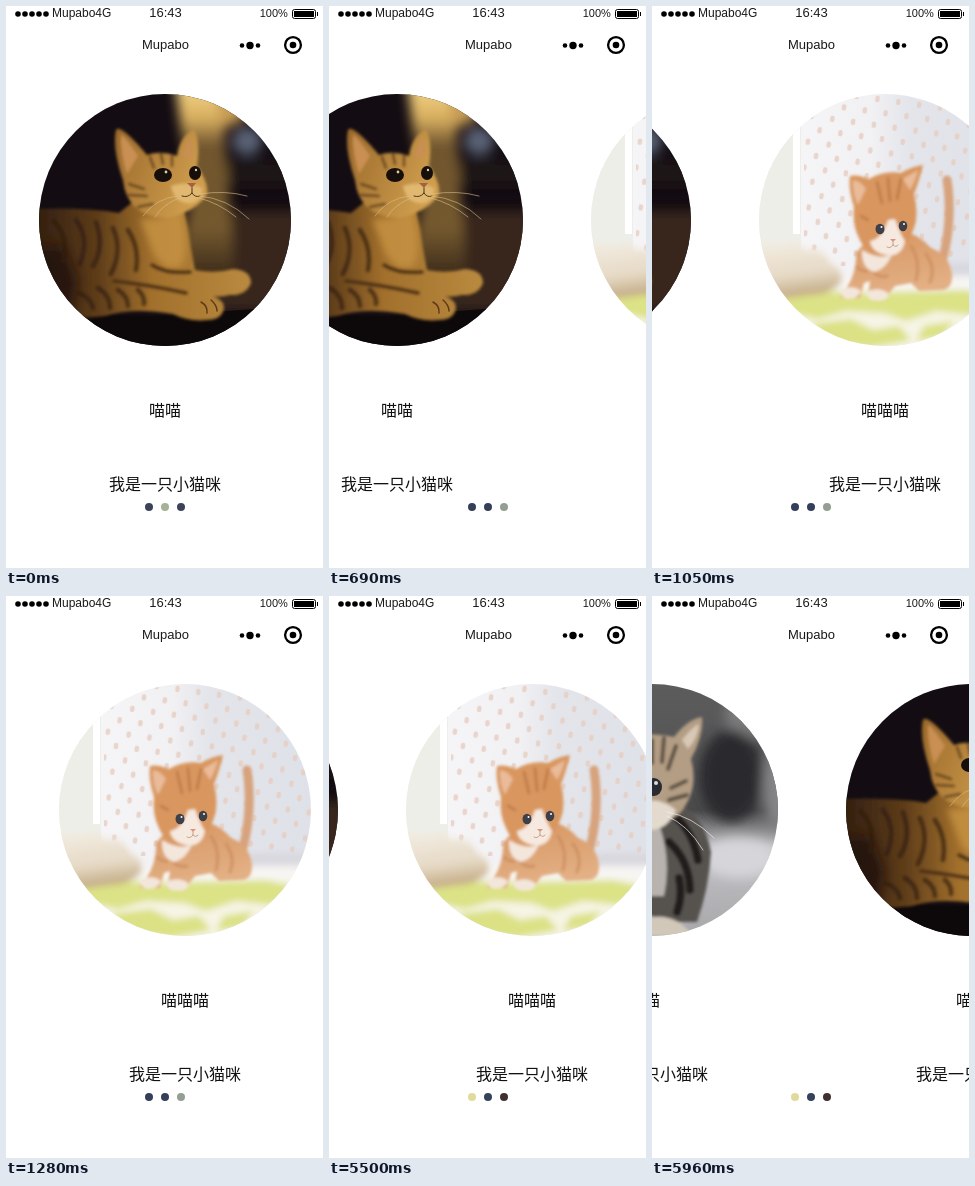
Animation of 317x562 px, one loop 6.01 s. Source, as an HTML page:

```html
<!DOCTYPE html>
<html lang="zh-CN">
<head>
<meta charset="utf-8">
<title>小猫</title>
<style>
  html, body { margin: 0; width: 100%; height: 100%; overflow: hidden; background: #fff; }
  svg { display: block; width: 100vw; height: 100vh; }
  .bar { font-family: "Liberation Sans", Arial, sans-serif; fill: #1a1a1a; }
  .caption { font: 300 16px "Noto Sans CJK SC", "Noto Sans CJK", sans-serif; fill: #111; text-anchor: middle; }
  .line { fill: none; stroke-linecap: round; }
</style>
</head>
<body>
<svg viewBox="0 0 317 562">
  <defs>
    <clipPath id="disc"><circle cx="159" cy="214" r="126"/></clipPath>
    <filter id="soft" x="-30%" y="-30%" width="160%" height="160%"><feGaussianBlur stdDeviation="1.500"/></filter>
    <filter id="hazy" x="-30%" y="-30%" width="160%" height="160%"><feGaussianBlur stdDeviation="3"/></filter>
    <filter id="blur" x="-50%" y="-50%" width="200%" height="200%"><feGaussianBlur stdDeviation="6"/></filter>
    <linearGradient id="lamp" x2="0" y2="1">
      <stop stop-color="#f6d78c"/><stop offset=".17" stop-color="#d9b060"/>
      <stop offset=".3" stop-color="#70552f"/><stop offset=".7" stop-color="#74592f"/>
      <stop offset="1" stop-color="#281912"/>
    </linearGradient>
    <linearGradient id="amber">
      <stop stop-color="#2f1c0f"/><stop offset=".3" stop-color="#5d3c19"/>
      <stop offset=".55" stop-color="#a2702c"/><stop offset="1" stop-color="#b98a3f"/>
    </linearGradient>
    <linearGradient id="face" x2="1" y2=".4">
      <stop stop-color="#9a682a"/><stop offset="1" stop-color="#cf9e4d"/>
    </linearGradient>
    <linearGradient id="ginger" x2=".3" y2="1">
      <stop stop-color="#d6945f"/><stop offset="1" stop-color="#e3b085"/>
    </linearGradient>
    <linearGradient id="wall">
      <stop stop-color="#f8f7f8"/><stop offset=".45" stop-color="#f1f0f3"/>
      <stop offset=".6" stop-color="#e3e5eb"/><stop offset="1" stop-color="#dfe1e8"/>
    </linearGradient>
    <linearGradient id="wool" x2=".2" y2="1">
      <stop stop-color="#f3ede3"/><stop offset=".6" stop-color="#e6dac6"/><stop offset="1" stop-color="#bfa57c"/>
    </linearGradient>
    <linearGradient id="mist" x2="0" y2="1">
      <stop stop-color="#5c5c5d"/><stop offset=".3" stop-color="#555556"/><stop offset=".5" stop-color="#4a4a4b"/>
      <stop offset=".65" stop-color="#c2c2c6"/><stop offset="1" stop-color="#a8a8ab"/>
    </linearGradient>
    <pattern id="spots" width="21" height="26" patternUnits="userSpaceOnUse" patternTransform="rotate(8)">
      <ellipse cx="5" cy="6" rx="2.300" ry="3.200" fill="#e6cdc0"/>
      <ellipse cx="16" cy="19" rx="2.300" ry="3.200" fill="#e6cdc0"/>
    </pattern>
  </defs>

  <g id="track">
    <!-- grey kitten -->
    <g transform="translate(-320)">
      <g clip-path="url(#disc)">
        <path fill="url(#mist)" d="M33 88h252v252H33z"/>
        <g filter="url(#blur)">
          <ellipse cx="258" cy="118" rx="26" ry="24" fill="#7b7b7c"/>
          <ellipse cx="238" cy="180" rx="32" ry="46" fill="#2c2c2d"/>
          <ellipse cx="284" cy="190" rx="14" ry="42" fill="#858587"/>
          <ellipse cx="246" cy="262" rx="38" ry="20" fill="#d6d6da"/>
        </g>
        <g filter="url(#soft)">
          <path fill="#56524f" d="M105 210h85q22 14 28 46-2 36-14 70H105z"/>
          <path fill="#b8b3ae" d="M135 226h30q14 36 6 74h-36z"/>
          <path class="line" stroke="#201f1f" stroke-width="8" d="M182 220q18 16 23 44M176 246q20 18 21 48M186 282q4 18-2 34"/>
          <path fill="#b39d84" d="M108 158q-3-28 1-37 18 5 30 20 23-5 42 0 14-18 28-20 2 18-11 42 9 32-13 56-30 18-61 0-24-28-16-61z"/>
          <path fill="#d8c8b6" d="M189 144q11-14 17-16-1 14-11 25z"/>
          <path class="line" stroke="#5c5042" stroke-width="4" d="M159 144v23m12-25-2 24m14-16-8 23m18 12-15 7m16 7-18 5"/>
          <path fill="#e3dacd" d="M137 212q24-16 46 2-8 19-25 20-17-2-21-22z"/>
          <path fill="#d2c8ba" d="M100 328q35-18 60-7 24-3 40 19H100z"/>
        </g>
        <g fill="#292b31"><ellipse cx="137" cy="191" rx="8" ry="9"/><ellipse cx="161" cy="191" rx="8" ry="9"/></g>
        <circle cx="163" cy="187" r="2" fill="#ddd"/>
        <path class="line" stroke="#eee" stroke-width=".7" d="M174 216q25 4 47 26M174 220q21 9 36 34"/>
      </g>
      <text class="caption" x="159" y="410">喵</text>
      <text class="caption" x="159" y="484">我是一只小猫咪</text>
    </g>

    <!-- tabby in lamplight -->
    <g>
      <g clip-path="url(#disc)">
        <path fill="#130c12" d="M33 88h252v252H33z"/>
        <g filter="url(#blur)">
          <path fill="#38261b" d="M200 205h95v100h-95z"/>
          <path fill="url(#lamp)" d="M169 76h45l7 80 8 130h-62l17-90z"/>
          <path fill="#c69c55" d="M210 80h20l10 32-25 12z"/>
          <ellipse cx="241" cy="135" rx="15" ry="14" fill="#596073"/>
          <path fill="#1b1212" d="M222 155h70v24h-70z"/>
        </g>
        <path fill="#0d080a" d="M30 308l120 2 140-10v45H30z"/>
        <g filter="url(#soft)">
          <path fill="url(#amber)" d="M25 203q55-2 88 4l15-12 50 8q5 20 7 39l4 22q20 4 38-1 18 1 18 14-5 13-21 12-14 4-30-1 24 2 24 14-2 12-17 12-18 2-34-6-40-7-68 2-33 4-42-1L25 260z"/>
          <path fill="#1e110b" opacity=".75" filter="url(#blur)" d="M25 245l32-6 15 36-8 38-40-8z"/>
          <path fill="#ca9544" d="M134 213q26 2 40-12 11 39 2 58-15 10-28-11z" opacity=".75" filter="url(#hazy)"/>
          <path class="line" stroke="#301d10" stroke-width="5" opacity=".65" d="M48 215q16 18 9 40M70 214q14 18 4 44M90 216q9 25-3 44M107 222q10 22-2 46M122 224q12 18 8 40M73 287q12 5 14 15M92 282q12 7 12 20M112 284q10 6 10 16M132 284q7 6 6 14"/>
          <path class="line" stroke="#4f3216" stroke-width="4" d="M108 275q36 4 72 12M146 259q14 9 38 7"/>
          <path fill="url(#face)" d="M117 174q-11-32-7-50 4-7 31 25 14-5 30 1 3-20 17-27 7 14 3 37 12 17 10 28-10 17-39 24-41-1-45-38z"/>
          <path fill="#c98f52" d="M115 129q5 2 17 21l-11 18q-7-22-6-39zm70 2q3 9 1 21l-9-1q2-13 8-20z"/>
          <path class="line" stroke="#62401a" stroke-width="2.500" d="M144 151l4 11m7-14 2 10m9-9v11M123 178l15 5m-15 6 18 1m-9 11 15-3"/>
          <path fill="#e0b86f" d="M165 180q16-6 31 2 2 11-10 15-17 2-21-17z"/>
        </g>
        <g fill="#150e0b"><ellipse cx="157" cy="169" rx="9" ry="7"/><ellipse cx="189" cy="167" rx="6" ry="7"/></g>
        <g fill="#ddd0a4"><circle cx="160" cy="166" r="1.400"/><circle cx="190" cy="164" r="1.200"/></g>
        <path fill="#a76142" d="M181 177l9 0-4 5z"/>
        <path class="line" stroke="#51321b" d="M186 182v5q-4 5-10 3m10-3q3 5 8 3"/>
        <path class="line" stroke="#d9c08a" stroke-width=".6" d="M194 188q25-4 47 2M193 190q28 2 50 23M193 192q20 5 37 19M172 190q-22 2-35 20M173 192q-17 7-24 19"/>
        <path class="line" stroke="#5d3a18" stroke-width="1.500" d="M195 296q7 4 6 11m4-13q6 5 6 11"/>
      </g>
      <text class="caption" x="159" y="410">喵喵</text>
      <text class="caption" x="159" y="484">我是一只小猫咪</text>
    </g>

    <!-- ginger kitten -->
    <g transform="translate(320)">
      <g clip-path="url(#disc)">
        <path fill="url(#wall)" d="M33 88h252v252H33z"/>
        <path fill="url(#spots)" opacity=".8" d="M78 88h207v172H78z"/>
        <path fill="#edeee8" d="M33 88h42v180H33z"/>
        <path fill="#fff" d="M67 88h7v140h-7z"/>
        <g filter="url(#hazy)">
          <path fill="#d9d8df" d="M222 257h70v14h-70z"/>
          <path fill="#f7f5f3" d="M110 270h180v18H110z"/>
          <path fill="#f6f4e4" d="M25 284h265v62H25z"/>
          <path fill="#dce286" d="M55 293q35-10 70-6l115-3 36 8-30 17-36-4-30 10-22-8-38-2-28 8-30-6z"/>
          <path fill="#dbe184" d="M85 318l40-5 22 11 26-4 12 14-42 8-40-4zm113 2 30-5-12 16-26 4z"/>
          <path fill="url(#wool)" d="M25 241q15-8 30-1 15-8 24 4 18-4 24 12 16 8 12 21-12 12-30 12l-60 8z"/>
        </g>
        <g filter="url(#soft)">
          <path class="line" stroke="#d7a37d" stroke-width="9" d="M217 252q10-40 4-78"/>
          <path fill="url(#ginger)" d="M143 232q38-18 62 10 18 6 21 26 1 14-9 16l-24 1-8-8-16 3-7 9h-20l2-14-6 2-4 15h-19q-2-5 5-9 11-17 10-36z"/>
          <path class="line" stroke="#c58454" stroke-width="3" opacity=".6" d="M185 240q10 16 5 34M200 248q10 14 4 28M131 261q5 5 10 4M148 267q7 5 13 3"/>
          <path fill="#f3e6db" d="M136 244q18 11 30 4-5 14-17 18-14-3-13-22zm-21 40q11-6 20 1-2 7-13 8-9-2-7-9zm25 2q12-6 22 1 2 7-9 8-13 0-13-9z"/>
          <path fill="#d9965f" d="M128 201q-6-18-4-31 8-2 19 3 15-9 32-6 12-7 22-8-4 17-9 29 5 21 0 34-8 23-23 28-25 1-32-18-7-14-5-31z"/>
          <path fill="#e9bb99" d="M127 174q8 1 13 9l-8 16q-6-12-5-25zm65-10q-3 12-8 20l-7-11z"/>
          <path class="line" stroke="#bc7947" stroke-width="2.500" d="M151 176l5 21m6-25 2 23m11-22-4 20M135 210l7 4"/>
          <path fill="#f6e9df" d="M162 214l7-1q5 15 10 22-2 13-15 15-19-3-20-15 12-2 18-21z"/>
        </g>
        <g fill="#3d4048"><ellipse cx="154" cy="223" rx="4.500" ry="5.200"/><ellipse cx="177" cy="220" rx="4.300" ry="5.200"/></g>
        <g fill="#fff"><circle cx="155.500" cy="221" r="1"/><circle cx="178" cy="218" r="1"/></g>
        <path fill="#d99582" d="M164 233h6l-3 3z"/>
        <path class="line" stroke="#b98f7c" stroke-width=".8" d="M167 236v3q-3 4-6 2m6-2q3 3 5 0"/>
      </g>
      <text class="caption" x="159" y="410">喵喵喵</text>
      <text class="caption" x="159" y="484">我是一只小猫咪</text>
    </g>
  </g>

  <g id="dots"><circle cx="143" cy="501" r="4"/><circle cx="159" cy="501" r="4"/><circle cx="175" cy="501" r="4"/></g>

  <g class="bar">
    <path class="line" stroke="#000" stroke-width="5.600" stroke-dasharray="0 7" d="M12 8h28.100"/>
    <text x="46" y="11" font-size="12">Mupabo4G</text>
    <text x="159.500" y="11" font-size="13" text-anchor="middle">16:43</text>
    <text x="253.700" y="11" font-size="11">100%</text>
    <rect x="286.500" y="3.500" width="23" height="9" rx="2" fill="none" stroke="#000"/>
    <path fill="#000" d="M288 5h20v6h-20zM311 6h1v4h-1z"/>
    <text x="159.500" y="43" font-size="13" text-anchor="middle">Mupabo</text>
    <g fill="#000">
      <circle cx="236" cy="39.500" r="2.300"/><circle cx="244" cy="39.500" r="3.700"/><circle cx="252" cy="39.500" r="2.300"/>
      <circle cx="287" cy="39" r="3.300"/>
    </g>
    <circle cx="287" cy="39" r="7.900" fill="none" stroke="#000" stroke-width="2.300"/>
  </g>
</svg>
<script>
const LOOP = 6010, SLIDE = 320, GLIDE = 985;
const track = document.getElementById('track');
const dots = [...document.getElementById('dots').children];

// The picture advances in discrete steps counted from an anchor time.
const stepped = (t, anchor, step) => anchor + Math.floor((t - anchor) / step) * step;

// Constant deceleration to rest.
const glide = (t, start) => {
  const u = Math.min(1, Math.max(0, (t - start) / GLIDE));
  return u * (2 - u);
};

function offsetAt(t) {
  if (t < 530) return 0;
  if (t < 5500) return -SLIDE * glide(stepped(t, 690, 45), 539);
  return SLIDE * (2 * glide(stepped(t, 5500, 46), 5465) - 1);
}

function dotColors(t) {
  if (t < 530) return ['#3a435a', '#a4b393', '#3a435a'];
  if (t < 5500) return ['#363f59', '#363f59', '#949f94'];
  return ['#dfdc9b', '#34425c', '#40302f'];
}

function render(t) {
  track.setAttribute('transform', `translate(${Math.floor(offsetAt(t))})`);
  dotColors(t).forEach((color, i) => dots[i].setAttribute('fill', color));
}

const begin = performance.now();
function frame() {
  render((performance.now() - begin) % LOOP);
  requestAnimationFrame(frame);
}
frame();
</script>
</body>
</html>
```
